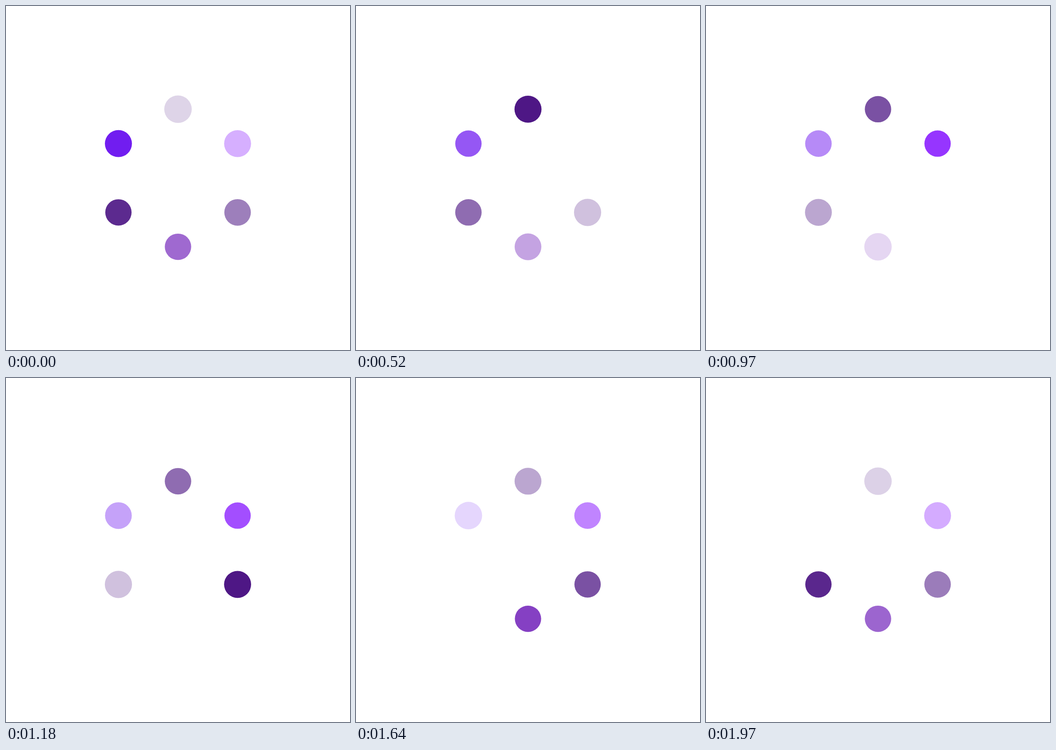
Recreate the animation shown at these times as an HTML page with a canvas. Size 748 by 748 pixels, loop 2 s.

```html
<!DOCTYPE html>
<html lang="en">
<head>
<meta charset="utf-8">
<title>Fading dots</title>
<style>
html, body { margin: 0; width: 100%; height: 100%; overflow: hidden; background: #fff; }
canvas { display: block; }
</style>
</head>
<body>
<canvas id="stage" width="748" height="748"></canvas>
<script>
const SIZE = 748, CENTER = SIZE / 2, ORBIT = SIZE * 0.2;
const LOOP = 2000, STEPS = 66, CUTOFF = 0.885;
const DARK = "#3d0079";
// Clockwise from the upper left
const COLORS = ["#711df0", DARK, "#8411ff", DARK, "#6f1eb9", DARK];
const ctx = document.getElementById("stage").getContext("2d");

// The dot starts slightly wide, tightens, then swells as it fades
function diameter(age) {
  return age < 0.1 ? 58.8 : 57.2 + 4.5 * age ** 3;
}

function drawDot(color, index, step) {
  const delay = index * STEPS / COLORS.length;
  const age = (step - delay + STEPS) % STEPS / STEPS;
  if (age > CUTOFF) return;
  const angle = (index * 60 - 150) * Math.PI / 180;
  ctx.globalAlpha = 1 - age;
  ctx.fillStyle = color;
  ctx.beginPath();
  ctx.arc(CENTER + ORBIT * Math.cos(angle), CENTER + ORBIT * Math.sin(angle),
    diameter(age) / 2, 0, 2 * Math.PI);
  ctx.fill();
}

function draw(now) {
  // Step starts are rounded to hundredths of a second
  const ticks = Math.floor(now % LOOP / 10);
  const step = Math.floor((ticks + 0.5) * STEPS * 10 / LOOP);
  ctx.clearRect(0, 0, SIZE, SIZE);
  COLORS.forEach((color, i) => drawDot(color, i, step));
}

const start = performance.now();
function tick() {
  draw(performance.now() - start);
  requestAnimationFrame(tick);
}
tick();
</script>
</body>
</html>
```
